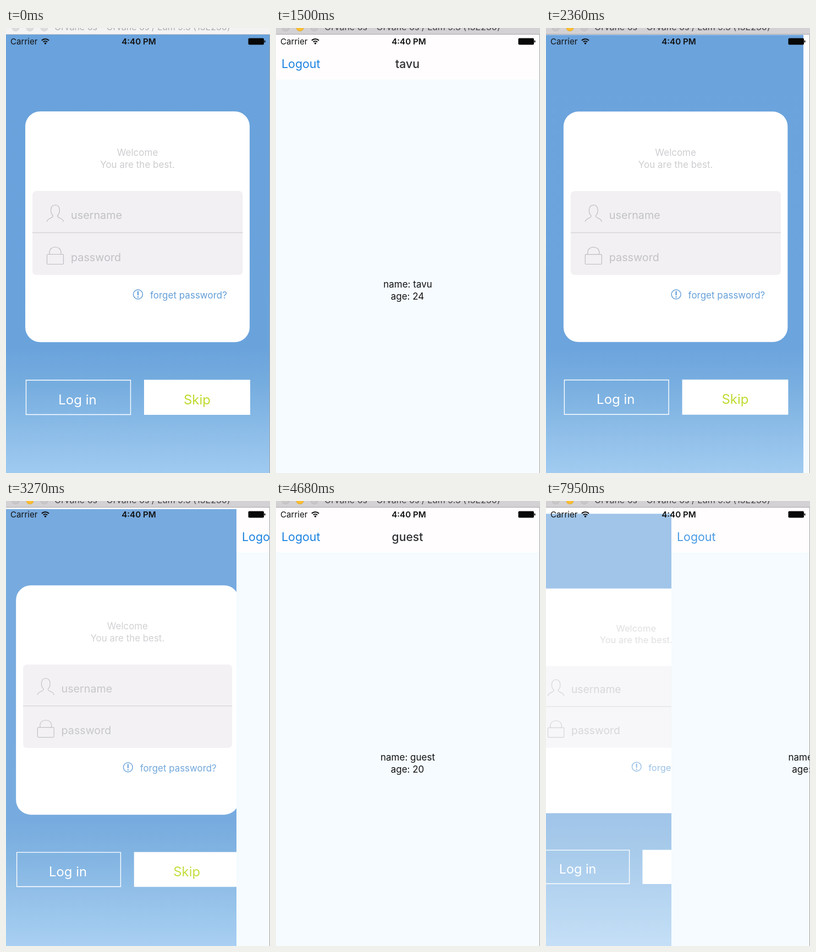
These frames come from a looping animation (480x811 px, 8000 ms). An HTML page with a canvas:

```html
<!DOCTYPE html>
<html lang="en">
<head>
<meta charset="utf-8">
<title>Login navigation</title>
<style>
  html, body { margin: 0; width: 100%; height: 100%; overflow: hidden; background: #fff; }
  canvas { display: block; width: 480px; height: 811px; }
</style>
</head>
<body>
<canvas id="stage" width="480" height="811"></canvas>
<script>
const ctx = document.getElementById('stage').getContext('2d');
const LOOP = 8000, WIDTH = 479, TOP = 12, MID_X = 239.5, MID_Y = 437;
const WINDOW_ACTIVE = 330;
const VISITS = [
  { push: 475.5, press: 1880, pop: 2030.5, name: 'tavu', age: '24' },
  { push: 3235.5, press: 7700, pop: 7850, name: 'guest', age: '20' },
];

const clamp = v => Math.min(1, Math.max(0, v));
const smooth = v => { v = clamp(v); return v * v * (3 - 2 * v); };

// Damped spring (tension 200, friction 26, start velocity 1.5) from 0 to 1.
function spring(ms) {
  if (ms <= 0) return 0;
  if (ms > 550) return 1;
  const s = ms / 1000, w = Math.sqrt(31);
  return clamp(1 - Math.exp(-13 * s) * (Math.cos(w * s) + 11.5 / w * Math.sin(w * s)));
}

function text(str, x, y, size, color, align = 'left', weight = 400) {
  ctx.font = `${weight} ${size}px Inter, Roboto, sans-serif`;
  ctx.textAlign = align;
  ctx.fillStyle = color;
  ctx.fillText(str, x, y);
}

function rect(x, y, w, h, color, radius = 0) {
  ctx.beginPath();
  ctx.roundRect(x, y, w, h, radius);
  ctx.fillStyle = color;
  ctx.fill();
}

function circle(x, y, r, color) {
  ctx.beginPath();
  ctx.arc(x, y, r, 0, 7);
  ctx.fillStyle = color;
  ctx.fill();
}

function stroke(path, color, width) {
  ctx.strokeStyle = color;
  ctx.lineWidth = width;
  ctx.stroke(new Path2D(path));
}

const sky = ctx.createLinearGradient(0, TOP, 0, 852);
sky.addColorStop(0, '#69a2dc');
sky.addColorStop(0.68, '#6aa3dc');
sky.addColorStop(0.76, '#76addf');
sky.addColorStop(0.95, '#9fcaf0');
sky.addColorStop(1, '#a8d0f3');

function drawLogin() {
  rect(0, TOP, WIDTH, 841, sky);
  rect(35, 152, 408, 420.5, '#fff', 27);
  text('Welcome', 239, 233, 17, '#cdcdd1', 'center');
  text('You are the best.', 239, 254.5, 17, '#cdcdd1', 'center');

  rect(48, 297, 382.5, 153, '#f2f0f3', 7);
  rect(48, 372.5, 382.5, 1, '#c8c8cb');
  text('username', 118, 348, 19.8, '#c1c1c5');
  text('password', 118, 425, 19.8, '#c1c1c5');
  stroke('M74.5 353 C75 346 86 347 85.5 342 C80 337 79.5 323 89.5 322.5 ' +
         'C99.5 323 99 337 93.5 342 C93 347 104 346 104.5 353', '#bcbcc0', 1.2);
  stroke('M76 412.5 H103 Q104.5 412.5 104.5 414 V429 Q104.5 430.5 103 430.5 ' +
         'H76 Q74.5 430.5 74.5 429 V414 Q74.5 412.5 76 412.5 ' +
         'M79 412.5 V409 C79 396 100 396 100 409 V412.5', '#bcbcc0', 1.2);

  stroke('M231.5 485.5 a8.5 8.5 0 1 0 17 0 a8.5 8.5 0 1 0 -17 0', '#649fd8', 1.5);
  rect(238.8, 479.5, 2.4, 8, '#649fd8', 1);
  circle(240, 490.3, 1.3, '#649fd8');
  text('forget password?', 262, 493, 17, '#649fd8');

  stroke('M36.5 641.7 H226.5 V704.5 H36.5 Z', '#fff', 1.4);
  rect(251, 641, 193, 64, '#fff');
  text('Log in', 130, 685.5, 24, '#fff', 'center');
  text('Skip', 347.5, 685.5, 24, '#bddb2c', 'center');
}

function drawProfile(user, logoutOpacity) {
  rect(0, TOP, WIDTH, 841, '#f5fbff');
  rect(0, TOP, WIDTH, 82, '#fffdfe');
  ctx.globalAlpha = logoutOpacity;
  text('Logout', 10, 73, 21.4, '#1a82df');
  ctx.globalAlpha = 1;
  text(user.name, 239, 73, 21.2, '#303034', 'center', 500);
  text('name: ' + user.name, MID_X, 473, 17, '#111', 'center');
  text('age: ' + user.age, 239, 495, 17, '#111', 'center');
}

function drawStatusBar() {
  text('Carrier', 8, 30, 15.1, '#111');
  text('4:40 PM', 241.5, 30, 15.2, '#111', 'center', 600);
  for (const r of [5, 9]) {
    ctx.beginPath();
    ctx.arc(71.5, 29, r, -Math.PI * 0.76, -Math.PI * 0.24);
    ctx.strokeStyle = '#111';
    ctx.lineWidth = 2.2;
    ctx.stroke();
  }
  circle(71.5, 28, 1.8, '#111');
  rect(440.5, 18.5, 28.5, 12, '#080808', 2);
  rect(469.5, 22.5, 2, 4, '#111', 1);
}

function drawWindowFrame(active) {
  rect(WIDTH, TOP, 1, 800, '#a0a0a3');
  rect(0, 0, 480, 11, active ? '#d3d1d3' : '#f4f3f4');
  rect(0, 11, 480, 1, active ? '#aaa8aa' : '#cfcdcf');
  [17.5, 43.5, 69.5].forEach((x, i) => {
    circle(x, -1, 7, active ? (i === 1 ? '#dba52e' : '#b9b7b9') : '#d0ced0');
    circle(x, -1, 6.2, active ? (i === 1 ? '#fdbe2f' : '#c9c7c9') : '#dddbdd');
  });
  text('Orvane 6s - Orvane 6s / Lum 9.3 (13E230)', 88, 4, 16, active ? '#454345' : '#adabad');
}

function draw(t) {
  const visit = t < VISITS[1].push ? VISITS[0] : VISITS[1];
  const left = t >= visit.pop;
  const progress = left ? 1 - spring(t - visit.pop) : spring(t - visit.push);
  const user = left ? { name: '', age: '' } : visit;
  const logoutOpacity = left
    ? 0.2 + 0.8 * smooth((t - visit.pop) / 150)
    : 1 - 0.8 * smooth((t - visit.press) / 150);

  rect(0, 0, 480, 811, '#fff');
  if (progress < 1) {
    const scale = 1 - 0.05 * progress;
    ctx.save();
    ctx.translate(MID_X - 0.3 * WIDTH * progress, MID_Y);
    ctx.scale(scale, scale);
    ctx.translate(-MID_X, -MID_Y);
    drawLogin();
    ctx.restore();
    rect(0, 0, 480, 811, `rgba(255,255,255,${0.7 * progress})`);
  }
  if (progress > 0) {
    ctx.save();
    ctx.translate(Math.round(WIDTH * (1 - progress)), 0);
    drawProfile(user, logoutOpacity);
    ctx.restore();
  }
  drawStatusBar();
  drawWindowFrame(t >= WINDOW_ACTIVE);
}

const start = performance.now();
function tick() {
  draw((performance.now() - start) % LOOP);
  requestAnimationFrame(tick);
}
tick();
</script>
</body>
</html>
```
